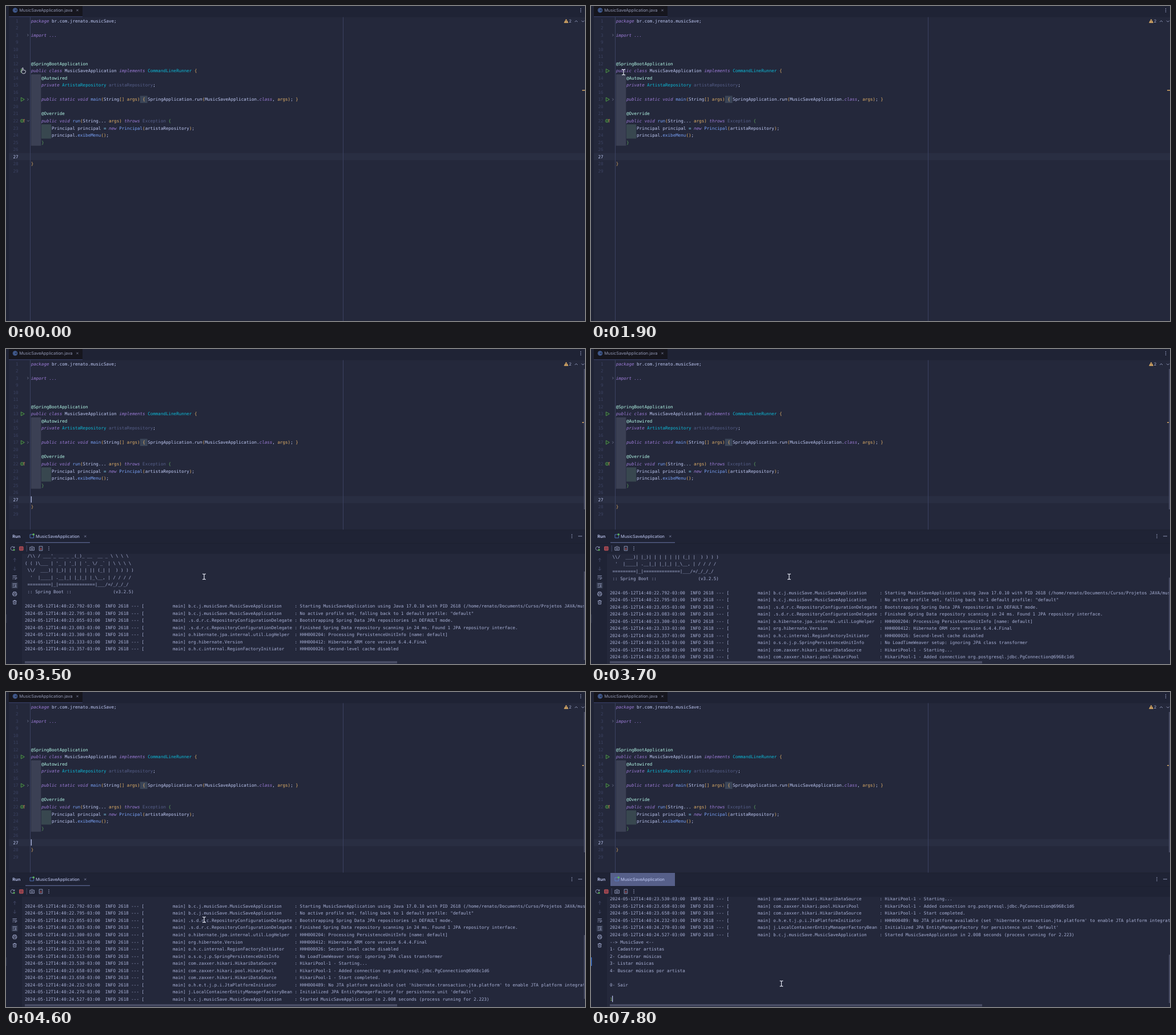
Write an HTML page that moves like this. It is 1014 px wide and 552 px high and loops after 8000 ms.

```html
<!DOCTYPE html>
<html lang="en">
<head>
<meta charset="utf-8">
<title>Editor run</title>
<style>
html, body { margin: 0; width: 100%; height: 100%; overflow: hidden; background: #24283b; }
svg { display: block; width: 100vw; height: 100vh; }
text { white-space: pre; text-rendering: geometricPrecision; }
.mono { font: 7.55px "DejaVu Sans Mono", monospace; fill: #c0caf5; }
.log { fill: #a9b1d6; }
.ui { font: 7.4px Inter, sans-serif; fill: #a9b1d6; }
.num { fill: #3b4261; text-anchor: end; }
.num.now { fill: #c0caf5; }
.k { fill: #9d7cd8; font-style: italic; }
.i { font-style: italic; }
.a { fill: #b4f9e8; }
.t { fill: #0db9d7; }
.g { fill: #565f89; }
.f { fill: #7aa2f7; }
.o { fill: #e0af68; }
.r { fill: #5fa15f; }
.e { fill: #89ddff; }
.line { fill: none; stroke: #a9b1d6; stroke-width: .8; }
.dim { stroke: #4a5173; }
.run { fill: #24382f; stroke: #55a04f; stroke-width: .9; stroke-linejoin: round; }
</style>
</head>
<body>
<svg id="stage" viewBox="0 0 1014 552" preserveAspectRatio="none"></svg>
<script>
const LOOP = 8000, STEP = 100;
const ROW = 12.52, CHAR = 4.545;
const CODE_X = 43.7, CODE_Y = 26, LOG_X = 33, LOG_Y = 366.5, BASE = 2.7;

const rect = (x, y, w, h, fill, extra = '') =>
  `<rect x="${x}" y="${y}" width="${w}" height="${h}" fill="${fill}" ${extra}/>`;
const path = (d, cls = 'line', extra = '') => `<path class="${cls}" d="${d}" ${extra}/>`;
const text = (x, y, s, cls = 'ui', extra = '') =>
  `<text x="${x}" y="${y + BASE}" class="${cls}" ${extra}>${s}</text>`;
const dots = (x, y) => [-2.8, 0, 2.8].map(d =>
  `<circle cx="${x}" cy="${y + d}" r=".75" fill="#a9b1d6"/>`).join('');
const cross = (x, y) => path(`M${x - 1.7} ${y - 1.7}l3.4 3.4m0 -3.4l-3.4 3.4`, 'line', 'opacity=".7"');
const group = (id, body, extra = '') => `<g id="${id}" ${extra}>${body}</g>`;
const escape = s => s.replace(/&/g, '&amp;').replace(/</g, '&lt;');

// <c>…</> colours a run of code with class c
const code = [
  [1, '<k>package</> br.com.jrenato.musicSave;'], [2, ''],
  [3, '<k>import ...</>'], [9, ''], [10, ''], [11, ''],
  [12, '<a>@SpringBootApplication</>'],
  [13, '<k>public class</> MusicSaveApplication <k>implements</> <t>CommandLineRunner</> <o>{</>'],
  [14, '    <a>@Autowired</>'],
  [15, '    <k>private</> <t>ArtistaRepository</> <g>artistaRepository</>;'], [16, ''],
  [17, '    <k>public static void</> <f>main</><o>(</>String<o>[] args)</> <o>{</> SpringApplication.<i>run</><o>(</>MusicSaveApplication.<k>class</>, <o>args)</>; <o>}</>'],
  [20, ''], [21, '    <a>@Override</>'],
  [22, '    <k>public void</> <f>run</><o>(</>String... <o>args)</> <k>throws</> <g>Exception</> <r>{</>'],
  [23, '        Principal principal <e>=</> <k>new</> <f>Principal</><o>(</>artistaRepository<o>)</>;'],
  [24, '        principal.<f>exibeMenu</><o>()</>;'],
  [25, '    <r>}</>'], [26, ''], [27, ''], [28, '<o>}</>'], [29, '']
];
const rowOf = n => CODE_Y + ROW * code.findIndex(c => c[0] === n);
const paint = s => s.replace(/<(\w)>(.*?)<\/>/g, '<tspan class="$1">$2</tspan>');

const banner = String.raw`
  .   ____          _            __ _ _
 /\\ / ___'_ __ _ _(_)_ __  __ _ \ \ \ \
( ( )\___ | '_ | '_| | '_ \/ _${'`'} | \ \ \ \
 \\/  ___)| |_)| | | | | || (_| |  ) ) ) )
  '  |____| .__|_| |_|_| |_\__, | / / / /
 =========|_|==============|___/=/_/_/_/
 :: Spring Boot ::                (v3.2.5)
`.slice(1).split('\n');
const info = (time, logger, msg) =>
  `2024-05-12T14:40:${time}-03:00  INFO 2618 --- [           main] ${logger.padEnd(40)} : ${msg}`;
const APP = 'b.c.j.musicSave.MusicSaveApplication';
const DELEGATE = '.s.d.r.c.RepositoryConfigurationDelegate';
const SOURCE = 'com.zaxxer.hikari.HikariDataSource';

// console output: [time, lines]
const output = [
  [2400, ['/home/renato/.sdkman/candidates/java/17.0.10-oracle/bin/java ...', '']],
  [2700, banner],
  [2800, [
    info('22.792', APP, 'Starting MusicSaveApplication using Java 17.0.10 with PID 2618 (/home/renato/Documents/Curso/Projetos JAVA/musicSave/target/classes)'),
    info('22.795', APP, 'No active profile set, falling back to 1 default profile: "default"')]],
  [3000, [
    info('23.055', DELEGATE, 'Bootstrapping Spring Data JPA repositories in DEFAULT mode.'),
    info('23.083', DELEGATE, 'Finished Spring Data repository scanning in 24 ms. Found 1 JPA repository interface.')]],
  [3300, [
    info('23.300', 'o.hibernate.jpa.internal.util.LogHelper', 'HHH000204: Processing PersistenceUnitInfo [name: default]'),
    info('23.333', 'org.hibernate.Version', 'HHH000412: Hibernate ORM core version 6.4.4.Final'),
    info('23.357', 'o.h.c.internal.RegionFactoryInitiator', 'HHH000026: Second-level cache disabled')]],
  [3600, [
    info('23.513', 'o.s.o.j.p.SpringPersistenceUnitInfo', 'No LoadTimeWeaver setup: ignoring JPA class transformer'),
    info('23.530', SOURCE, 'HikariPool-1 - Starting...')]],
  [3700, [
    info('23.658', 'com.zaxxer.hikari.pool.HikariPool', 'HikariPool-1 - Added connection org.postgresql.jdbc.PgConnection@6968c1d6'),
    info('23.658', SOURCE, 'HikariPool-1 - Start completed.')]],
  [4200, [
    info('24.232', 'o.h.e.t.j.p.i.JtaPlatformInitiator', "HHH000489: No JTA platform available (set 'hibernate.transaction.jta.platform' to enable JTA platform integration)"),
    info('24.270', 'j.LocalContainerEntityManagerFactoryBean', "Initialized JPA EntityManagerFactory for persistence unit 'default'")]],
  [4600, [info('24.527', APP, 'Started MusicSaveApplication in 2.008 seconds (process running for 2.223)')]],
  [4700, ['--> MusicSave <--', '1- Cadastrar artistas', '2- Cadastrar músicas', '3- Listar músicas',
    '4- Buscar músicas por artista', '', '0- Sair', '']]
];

// pointer stops: [time, x, y]
const pointer = [
  [0, 30, 113], [500, 30, 113], [600, 30, 114.5], [700, 30.5, 116], [1500, 30.5, 116],
  [1900, 57, 116], [2000, 57, 116], [2400, 375, 304], [2500, 340, 405], [2600, 340, 405],
  [2700, 347, 399], [5000, 347, 399], [5100, 351, 405], [5200, 345, 450], [5300, 330, 500],
  [5400, 323, 514], [5600, 323, 514], [5900, 333.5, 511], [LOOP, 333.5, 511]
];
const caretOn = [[3100, 3600], [4200, 4700], [5200, 5600]];

function editor() {
  const play = y => path(`M26.3 ${y - 3.4}l6 3.4l-6 3.4z`, 'run');
  const fold = y => path(`M37.3 ${y - 2}l2 2l-2 2`, 'line', 'opacity=".6"');
  const y17 = rowOf(17), y22 = rowOf(22);
  return rect(0, 0, 1014, 552, '#24283b')
    + rect(0, 0, 1014, 19.5, '#1f2335') + rect(0, 0, 5, 552, '#1f2335')
    + rect(5, 0, 129, 19, '#16161e') + rect(5, 18, 129, 1.3, '#363d63')
    + '<circle cx="16" cy="7.5" r="3.7" fill="#25324f" stroke="#5c86d6" stroke-width=".8"/>'
    + path('M17.4 6.3a1.8 1.8 0 1 0 0 2.4', 'line', 'style="stroke:#7aa2f7"')
    + text(23.2, 7.5, 'MusicSaveApplication.java', 'ui', 'style="fill:#9298b5"')
    + cross(125, 7.5) + dots(1006.5, 7.5)
    + rect(5, 257.6, 1009, ROW, '#292e42')
    + rect(42, 19.5, 1, 533, '#3b4261') + rect(590, 19.5, 1, 533, '#3b4261')
    + rect(43.7, 119.8, 17.6, 125, '#3b4054') + rect(61.9, 207.4, 17.3, 25, '#38474f')
    + rect(234.8, y17 - 6.3, 12.8, ROW, '#3b4557')
    + code.map(([n, s], i) => {
      const y = CODE_Y + ROW * i;
      return text(21.6, y, n, 'mono num' + (n === 27 ? ' now' : '')) + text(CODE_X, y, paint(s), 'mono');
    }).join('')
    + fold(rowOf(3)) + fold(y17) + play(rowOf(13)) + play(y17)
    + `<circle cx="28" cy="${y22}" r="2.7" class="run"/>`
    + path(`M28 ${y22 - 1.5}v3`, 'run')
    + path(`M31.7 ${y22 + 3}v-6m-1.4 1.5l1.4 -1.5l1.4 1.5`, 'line', 'style="stroke:#c77d55"')
    + group('chevron', path(`M36.8 ${y22 - 1}l2 2l2 -2`, 'line', 'opacity=".6"'))
    + path('M981 23.2l3.4 6h-6.8z', '', 'fill="#e0af68" stroke="#e0af68" stroke-width=".8" stroke-linejoin="round"')
    + path('M981 25v2m0 .6v.9', 'line', 'style="stroke:#24283b"')
    + text(985.8, 26.7, '2')
    + path('M996.2 28l2.4 -2.4l2.4 2.4M1008 25.6l2.4 2.4l2.4 -2.4')
    + rect(1009, 0, 5, 1.4, '#e0af68', 'id="tick"')
    + rect(CODE_X, 258.2, 1.2, 11, '#c0caf5', 'id="caret"');
}

function menu() {
  const item = (y, s, key = '') => text(45, y, s) + text(232, y, key, 'ui', 'text-anchor="end" opacity=".6"');
  return rect(25.5, 100.5, 212, 67, '#1f2335', 'rx="3" stroke="#3b4261"')
    + rect(28.5, 103.5, 206, 14, '#3d59a1', 'rx="2" id="hover"')
    + item(110.5, "Run 'MusicSaveAppli....main()'", 'Ctrl+Shift+F10')
    + item(124.5, "Debug 'MusicSaveAppli....main()'")
    + item(138.5, "Run 'MusicSaveAppli....main()' with Coverage")
    + rect(30, 147.5, 203, .7, '#3b4261')
    + item(157.5, 'Modify Run Configuration...')
    + path('M34 107.3l5.5 3.2l-5.5 3.2z', 'run');
}

function panel() {
  let n = 0;
  const lines = output.map(([, rows], i) => group('out' + i, rows.map(s =>
    text(LOG_X, LOG_Y + ROW * n++, escape(s), 'mono log')).join(''))).join('');
  return rect(0, 317, 1014, 235, '#1f2335') + rect(28, 359, 986, 193, '#24283b')
    + rect(5, 316.6, 1009, .8, '#1b1e2e') + rect(5, 340, 1009, .8, '#1b1e2e')
    + cross(138.8, 328.3)
    + rect(34, 338.6, 113, 1.4, '#565f89')
    + rect(34, 317, 113, 23, '#565f89', 'id="tab"')
    + text(11.3, 328, 'Run', 'ui', 'style="font-weight:600;fill:#c0caf5"')
    + path('M42 325h6.6v6h-6.6z', 'line', 'style="stroke:#5c86d6"')
    + '<circle cx="48.2" cy="325" r="1.8" fill="#5fb75a"/>'
    + text(52, 328, 'MusicSaveApplication', 'ui', 'style="fill:#c0caf5"')
    + dots(991, 328) + path('M1002 328h7')
    + path('M14.4 348a3.3 3.3 0 1 0 .2 2.6M14.8 346v2.4h-2.4')
    + '<circle cx="14" cy="352" r="1.6" fill="#5fb75a"/>'
    + rect(23.5, 346.3, 6.6, 6.6, '#8a3f4c', 'rx=".8" stroke="#db5c5c" stroke-width=".8"')
    + rect(35.8, 344, .8, 11, '#4a5173')
    + path('M41.8 347.3h2l.8 -1.2h2l.8 1.2h2v5.4h-7.6z') + '<circle cx="45.6" cy="349.8" r="1.5" class="line"/>'
    + path('M58.2 345.8h5.6v7.4h-5.6z') + path('M61 348v3.6m-1.5 -1.4l1.5 1.4l1.5 -1.4', 'line', 'style="stroke:#db5c5c"')
    + dots(75, 349.5)
    + path('M15.2 373.2v-6.4m-2.4 2.4l2.4 -2.4l2.4 2.4M15.2 381.6v6.4m-2.4 -2.4l2.4 2.4l2.4 -2.4', 'line dim')
    + path('M11.5 397.4h7.4M11.5 400h6a1.4 1.4 0 0 1 0 2.8h-2m1.2 -1.2l-1.2 1.2l1.2 1.2M11.5 402.8h2')
    + rect(9.5, 408.6, 11.5, 11.5, '#2f3549', 'rx="2"')
    + path('M11.5 411.5h7.4M11.5 414h3M11.5 417.2h7.4M17 412.6v3.2m-1.3 -1.2l1.3 1.2l1.3 -1.2')
    + path('M13 427.6v-2h4.4v2M13 431h-1.4v-3.4h7.2v3.4h-1.4M13 429.8h4.4v2.8h-4.4z')
    + path('M11.8 441.6h6.8M14 441.6v-1.2h2.4v1.2M12.6 441.6l.4 5.6h4.4l.4 -5.6M14.4 443.4v2.2m1.6 -2.2v2.2')
    + rect(0, 465, 1.3, 15, '#2f3549', 'id="mark"')
    + `<g clip-path="url(#view)">${group('log', lines)}</g>`
    + rect(33, 547, 652, 4, '#474b63', 'id="hbar"')
    + rect(1012, 35, 2, 246, '#474b63')
    + rect(1012, 0, 2, 0, '#474b63', 'id="vbar"')
    + group('typed', text(LOG_X, 538, '1', 'mono', 'style="fill:#6f9a58"'))
    + rect(0, 0, 1.2, 11, '#c0caf5', 'id="logCaret"');
}

const outline = 'fill="#24283b" stroke="#e6e9f5" stroke-width=".9" stroke-linejoin="round"';
document.getElementById('stage').innerHTML =
  '<clipPath id="view"><rect x="28" y="359.3" width="986" height="186"/></clipPath>'
  + editor() + group('menu', menu()) + group('panel', panel())
  + group('hand', path('M-1.6 1v-4.8a.9 .9 0 0 1 1.8 0v3l3.2 .6q1.2 .3 1 1.6l-.5 2.2q-.4 1.8 -2.2 1.8h-1.6q-1.2 0 -1.9 -1l-2.2 -3q.6 -1.4 2.4 -.4z', '', outline))
  + group('arrow', path('M0 0v8.4l2 -1.9l1.4 3l1.4 -.6l-1.4 -3h2.7z', '', outline))
  + group('beam', path('M-2.8 -4.6q2.8 -.4 2.8 1.2v6.8q0 1.6 -2.8 1.2M2.8 -4.6q-2.8 -.4 -2.8 1.2m0 6.8q0 1.6 2.8 1.2', '', 'fill="none" stroke="#e6e9f5" stroke-width="1.2"'));

const $ = id => document.getElementById(id);
const show = (id, on) => $(id).setAttribute('display', on ? 'inline' : 'none');
const set = (id, attrs) => { for (const k in attrs) $(id).setAttribute(k, attrs[k]); };
const easeOut = p => 1 - (1 - Math.min(1, Math.max(0, p))) ** 3;
const scrollEnd = rows => Math.max(0, (rows - 1) * ROW - 171.5);

function pointerAt(t) {
  const i = pointer.findIndex(p => p[0] > t);
  const [t0, x0, y0] = pointer[i - 1], [t1, x1, y1] = pointer[i];
  const p = (t - t0) / (t1 - t0);
  return [x0 + (x1 - x0) * p, y0 + (y1 - y0) * p];
}

// one empty input row always follows the printed lines
function drawLog(t) {
  let rows = 1, total = 1, scroll = 0;
  output.forEach(([at, lines], i) => {
    const next = rows + lines.length;
    scroll += (scrollEnd(next) - scrollEnd(rows)) * easeOut((t - at) / 165);
    rows = next;
    if (t >= at) total = rows;
    show('out' + i, t >= at);
  });
  set('log', { transform: `translate(0 ${-scroll})` });
  const height = total * ROW, view = 187;
  const thumb = view * Math.min(1, view / height);
  show('vbar', height > view + 1);
  set('vbar', { y: 358 + (view - thumb) * scroll / (scrollEnd(total) || 1), height: thumb });
  show('hbar', t >= 2800);
}

function draw(t) {
  const open = t >= 2100, focus = t >= 5600, typed = t >= 6500;
  show('menu', t >= 1200 && t < 1800);
  show('hover', t >= 1600);
  show('chevron', t < 1800);
  show('panel', open);
  set('tick', { y: open ? 128 : 147 });
  show('caret', caretOn.some(([a, b]) => t >= a && t < b));
  set('mark', { fill: focus ? '#3d7be0' : '#2f3549' });
  show('tab', t >= 5700);
  show('typed', typed);
  show('logCaret', focus && !(t >= 7200 && t < 7800));
  set('logCaret', typed ? { x: LOG_X + CHAR - .5, y: 532.3 } : { x: LOG_X + 7 * CHAR - .5, y: 507.4 });
  drawLog(t);

  const [x, y] = pointerAt(t);
  const kind = t < 1600 ? 'hand' : t < 1800 ? 'arrow' : 'beam';
  for (const id of ['hand', 'arrow', 'beam']) show(id, id === kind);
  set(kind, { transform: `translate(${x} ${y})` });
}

const start = performance.now();
function tick() {
  const t = (performance.now() - start) % LOOP;
  draw(Math.floor(t / STEP) * STEP);
  requestAnimationFrame(tick);
}
tick();
</script>
</body>
</html>
```
